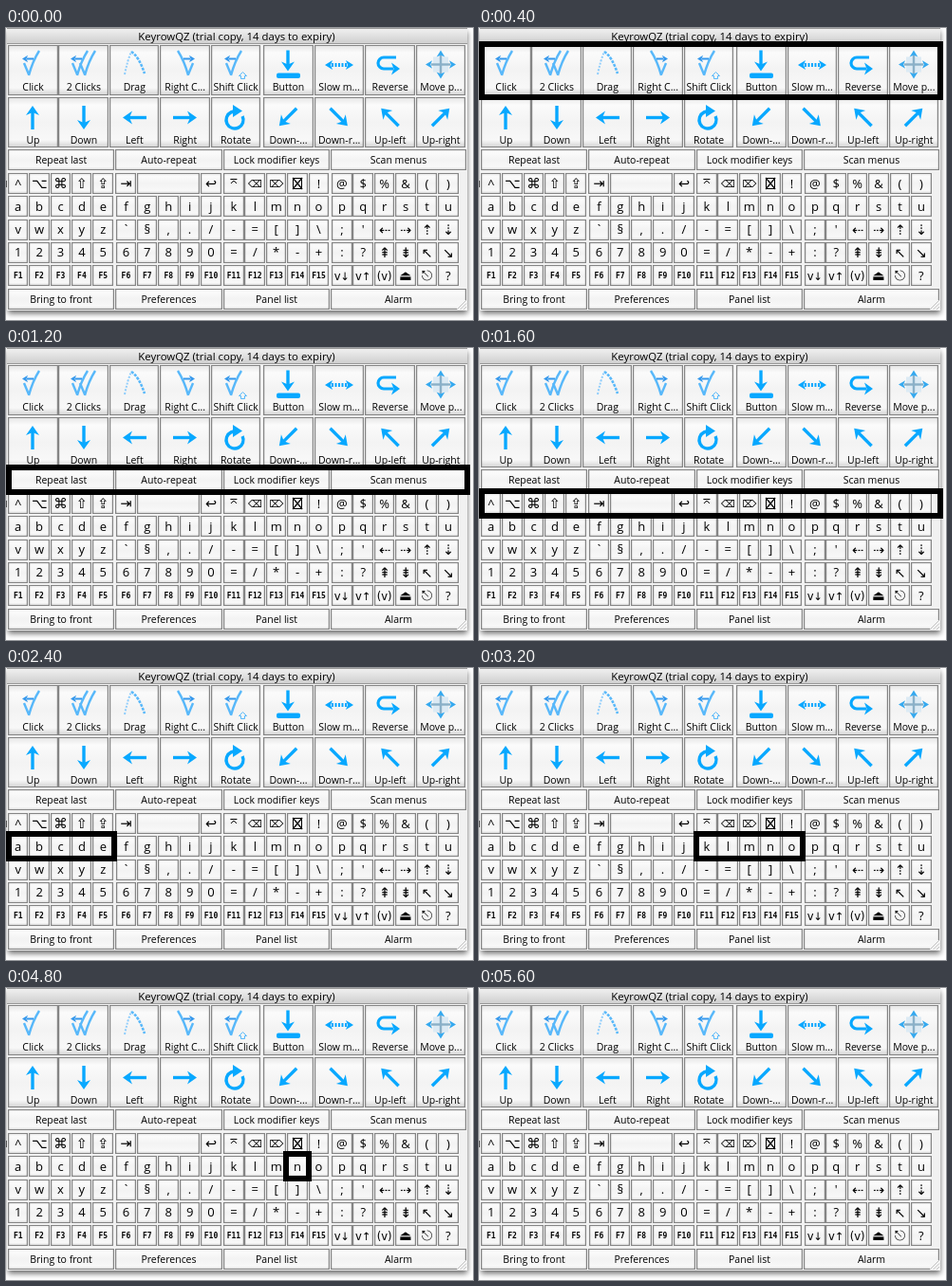
These frames come from a looping animation (492x308 px, 6 s). An HTML page with a canvas:

```html
<!DOCTYPE html>
<html lang="en">
<head>
<meta charset="utf-8">
<title>Scanning keyboard panel</title>
<style>
html, body { margin: 0; width: 100%; height: 100%; overflow: hidden; background: #fff; }
canvas { display: block; }
</style>
</head>
<body>
<canvas id="stage" width="492" height="308"></canvas>
<script>
const stage = document.getElementById('stage');
const view = stage.getContext('2d');
const panel = document.createElement('canvas');
panel.width = stage.width;
panel.height = stage.height;
const c = panel.getContext('2d');

const SANS = '"Open Sans", "Noto Sans", "DejaVu Sans", sans-serif';
const SYMBOLS = '"DejaVu Sans", sans-serif';
const MONO = '"DejaVu Sans Mono", monospace';
const BLUE = '#08a8ff';
const PALE = '#58b8fa';

function label(text, x, y, size = 10.5, family = SANS, weight = '') {
  c.font = `${weight} ${size}px ${family}`;
  c.textAlign = 'center';
  c.fillStyle = '#000';
  c.fillText(text, x, y);
}

function cell(x0, y0, x1, y1) {
  const x = Math.round(x0), y = Math.round(y0);
  const w = Math.round(x1) - x, h = Math.round(y1) - y;
  c.fillStyle = '#858585';
  c.fillRect(x, y, w, h);
  const face = c.createLinearGradient(0, y, 0, y + h);
  face.addColorStop(0, '#e4e4e4');
  face.addColorStop(0.15, '#fbfbfb');
  face.addColorStop(0.5, '#f3f3f3');
  face.addColorStop(0.85, '#f8f8f8');
  face.addColorStop(1, '#d2d2d2');
  c.fillStyle = face;
  c.fillRect(x + 1, y + 1, w - 2, h - 2);
  c.fillStyle = 'rgba(0,0,0,.1)';
  c.fillRect(x + 1, y + 1, 1, h - 2);
  c.fillRect(x + w - 2, y + 1, 1, h - 2);
}

function line(points, width, color = BLUE, dash = []) {
  c.strokeStyle = color;
  c.lineWidth = width;
  c.setLineDash(dash);
  c.beginPath();
  points.forEach(([x, y]) => c.lineTo(x, y));
  c.stroke();
  c.setLineDash([]);
}

function curve([x0, y0], [cx, cy], [x1, y1], width, color, dash = []) {
  c.strokeStyle = color;
  c.lineWidth = width;
  c.setLineDash(dash);
  c.beginPath();
  c.moveTo(x0, y0);
  c.quadraticCurveTo(cx, cy, x1, y1);
  c.stroke();
  c.setLineDash([]);
}

function poly(points, color = BLUE) {
  c.fillStyle = color;
  c.beginPath();
  points.forEach(([x, y]) => c.lineTo(x, y));
  c.fill();
}

function at(x, y, angle, draw, flip = 1) {
  c.save();
  c.translate(x, y);
  c.rotate(angle);
  c.scale(flip, 1);
  draw();
  c.restore();
}

const head = (x, y, angle, size, color) => at(x, y, angle, () =>
  poly([[0, 0], [-size, -size * 0.62], [-size * 0.75, 0], [-size, size * 0.62]], color));

// Arrow centred on a point; angle 0 points right.
function arrow(x, y, angle, length = 25) {
  const tip = length / 2;
  at(x, y, angle, () => {
    line([[-tip, 0], [tip - 5, 0]], 3.4);
    poly([[tip, 0], [tip - 10, -7], [tip - 7, 0], [tip - 10, 7]]);
  });
}

// Click mark: a tick with a small arrow towards the mouse button's side.
function tick(x, flip = 1, withArrow = true) {
  at(x, 0, 0, () => {
    line([[-9, 37], [-4, 49]], 2.4, PALE);
    curve([-4, 50], [0, 35], [7, 24], 2.4, PALE);
    if (!withArrow) return;
    line([[-6, 32.5], [1, 32.5]], 2, '#3598ec');
    head(-11, 32.5, Math.PI, 6, '#3598ec');
  }, flip);
}

function dragIcon() {
  curve([125, 49], [128, 34], [132, 25], 2, '#8fcdfb', [2, 1.5]);
  curve([132, 25], [140, 30], [146, 48], 2.6, PALE, [3, 1.2]);
}

function shiftMark(x, y) {
  line([[x, y - 4], [x + 4, y], [x + 2, y], [x + 2, y + 3], [x - 2, y + 3],
    [x - 2, y], [x - 4, y], [x, y - 4]], 1, PALE);
}

function buttonIcon() {
  arrow(297, 34.5, Math.PI / 2, 22);
  c.fillStyle = BLUE;
  c.beginPath();
  c.roundRect(285, 47.5, 25, 5.5, 2);
  c.fill();
}

function slowIcon() {
  line([[343, 39], [361, 39]], 4, BLUE, [2, 1.5]);
  head(336, 39, Math.PI, 8);
  head(366, 39, 0, 8);
}

function reverseIcon() {
  c.strokeStyle = BLUE;
  c.lineWidth = 3.2;
  c.beginPath();
  c.moveTo(411, 31);
  c.lineTo(398, 31);
  c.arc(398, 37, 6, -Math.PI / 2, Math.PI / 2, true);
  c.lineTo(408, 43);
  c.stroke();
  poly([[415, 43], [406, 36.5], [408.5, 43], [406, 49.5]]);
}

function moveIcon() {
  const x = 458, y = 38.5;
  c.fillStyle = '#dceaf4';
  c.fillRect(x - 8, y - 8, 16, 16);
  line([[x - 10, y], [x + 10, y]], 2.4, '#8ab0c8');
  line([[x, y - 10], [x, y + 10]], 2.4, '#8ab0c8');
  for (let i = 0; i < 4; i++) {
    const a = i * Math.PI / 2;
    head(x + 16 * Math.cos(a), y + 15 * Math.sin(a), a, 7, '#35a9ef');
  }
}

function rotateIcon() {
  c.strokeStyle = BLUE;
  c.lineWidth = 3.4;
  c.beginPath();
  c.arc(241, 97, 9, -0.45, Math.PI * 1.5);
  c.stroke();
  poly([[239, 81], [249, 87.5], [239, 94]]);
}

function drawFrame() {
  c.fillStyle = '#fff';
  c.fillRect(0, 0, 492, 308);
  c.save();
  c.shadowColor = 'rgba(0,0,0,.6)';
  c.shadowBlur = 6;
  c.shadowOffsetY = 3;
  c.fillStyle = '#eee';
  c.fillRect(2, 1, 484, 297);
  c.restore();
  c.fillStyle = '#f1f1f1';
  c.fillRect(1, 0, 485, 298);
  const bar = c.createLinearGradient(0, 0, 0, 16);
  bar.addColorStop(0, '#f2f2f2');
  bar.addColorStop(1, '#cfcfcf');
  c.fillStyle = bar;
  c.fillRect(1, 0, 485, 16);
  c.fillStyle = '#999';
  c.fillRect(1, 0, 485, 1);
  c.fillRect(1, 16, 485, 1);
  c.fillStyle = '#555';
  c.fillRect(0, 161, 1, 7);
  label('KeyrowQZ (trial copy, 14 days to expiry)', 243, 13, 11.4);
}

function drawButtons() {
  const names = [
    ['Click', '2 Clicks', 'Drag', 'Right C...', 'Shift Click', 'Button', 'Slow m...', 'Reverse', 'Move p...'],
    ['Up', 'Down', 'Left', 'Right', 'Rotate', 'Down-...', 'Down-r...', 'Up-left', 'Up-right']
  ];
  names.forEach((row, r) => row.forEach((name, i) => {
    const x = i < 5 ? 2 + i * 53.4 : 271 + (i - 5) * 53.6;
    cell(x, r ? 73 : 18, x + 52.6, r ? 126 : 71);
    label(name, x + 26.5, r ? 122 : 66);
  }));

  tick(28);
  tick(79);
  tick(87, 1, false);
  dragIcon();
  tick(188, -1);
  tick(241);
  shiftMark(249.5, 50.5);
  buttonIcon();
  slowIcon();
  reverseIcon();
  moveIcon();

  const q = Math.PI / 4;
  arrow(28, 94.5, -2 * q);
  arrow(82, 94.5, 2 * q);
  arrow(135.5, 94.5, 4 * q);
  arrow(188.5, 94.5, 0);
  rotateIcon();
  [3, 1, -3, -1].forEach((n, i) => arrow(297 + i * 53.7, 94, n * q, 26));
}

function drawBars() {
  const edges = [2, 115, 229, 342, 486];
  const bars = [
    [128, ['Repeat last', 'Auto-repeat', 'Lock modifier keys', 'Scan menus']],
    [275, ['Bring to front', 'Preferences', 'Panel list', 'Alarm']]
  ];
  for (const [y, names] of bars) {
    names.forEach((name, i) => {
      cell(edges[i], y, edges[i + 1] - 1, y + 22);
      label(name, (edges[i] + edges[i + 1] - 1) / 2, y + 15);
    });
  }
  c.fillStyle = '#f6f6f6';
  c.fillRect(475, 287, 10, 10);
  for (let i = 0; i < 3; i++) line([[475 + i * 3.5, 297], [485, 287 + i * 3.5]], 1, '#c0c0c0');
}

function glyph(ch, x, y) {
  if (ch === '⌅') {
    line([[x - 3.5, y - 4.5], [x + 3.5, y - 4.5]], 1, '#000');
    line([[x - 3, y], [x, y - 3], [x + 3, y]], 1, '#000');
  } else if (ch === '⌧') {
    c.strokeStyle = '#000';
    c.lineWidth = 1;
    c.strokeRect(Math.round(x) - 4.5, Math.round(y) - 5.5, 9, 11);
    line([[x - 5, y - 6], [x + 5, y + 6]], 1.2, '#000');
    line([[x + 5, y - 6], [x - 5, y + 6]], 1.2, '#000');
  } else if (/^F\d/.test(ch)) {
    label(ch, x, y + 3, 8, MONO, 'bold');
  } else if ('⌫⌦'.includes(ch)) {
    label(ch, x, y + 4, 10.5, SYMBOLS);
  } else if (ch.charCodeAt(0) > 0x2000) {
    label(ch, x, y + 5, 14.5, SYMBOLS);
  } else if (ch.length > 1) {
    label(ch, x, y + 4.5, 11.5, SYMBOLS);
  } else {
    label(ch, x, y + 4.5, 13);
  }
}

function drawKeys() {
  const step = 22.4;
  const rows = [
    ['^ ⌥ ⌘ ⇧ ⇪', '', '⌅ ⌫ ⌦ ⌧ !', '@ $ % & ( )'],
    ['a b c d e', 'f g h i j', 'k l m n o', 'p q r s t u'],
    ['v w x y z', '` § , . /', '- = [ ] \\', "; ' ⇠ ⇢ ⇡ ⇣"],
    ['1 2 3 4 5', '6 7 8 9 0', '= / * - +', ': ? ⇞ ⇟ ↖ ↘'],
    ['F1 F2 F3 F4 F5', 'F6 F7 F8 F9 F10', 'F11 F12 F13 F14 F15', 'v↓ v↑ (v) ⏏ ⎋ ?']
  ];
  rows.forEach((groups, r) => {
    const y = 153 + r * 24.3;
    groups.forEach((keys, g) => {
      if (!keys) return;
      const left = [1.8, 115.5, 229, 343][g];
      keys.split(' ').forEach((key, i) => {
        const x = left + i * step;
        cell(x, y, x + step - 0.9, y + 22);
        glyph(key, x + 10.9, y + 11);
      });
    });
  });
  cell(115, 153, 137, 175);
  cell(138, 153, 204, 175);
  cell(205, 153, 227, 175);
  glyph('⇥', 126.5, 164);
  glyph('↩', 216, 164);
}

// Scan order: rows, then groups of a row, then single keys.
const spots = [
  ...[[14, 76], [69, 131], [123, 155], [148, 180], [172, 204]].map(([a, b]) => [0, a, 489, b]),
  ...[[0, 117], [112, 230], [226, 344], [226, 256], [247, 277], [270, 300], [292, 322]].map(([a, b]) => [a, 172, b, 204])
];
const STEP = 400, LOOP = 6000, EDGE = 6;

function render(time) {
  const n = Math.floor((time % LOOP) / STEP);
  view.drawImage(panel, 0, 0);
  const spot = spots[n - 1];
  if (spot) {
    const [x0, y0, x1, y1] = spot;
    view.strokeStyle = '#000';
    view.lineWidth = EDGE;
    view.strokeRect(x0 + EDGE / 2, y0 + EDGE / 2, x1 - x0 - EDGE, y1 - y0 - EDGE);
  } else if (n === spots.length + 1) {
    // The chosen key flashes inverted.
    view.globalCompositeOperation = 'difference';
    view.fillStyle = '#fff';
    view.fillRect(295, 175, 24, 26);
    view.globalCompositeOperation = 'source-over';
  }
}

drawFrame();
drawButtons();
drawBars();
drawKeys();

const start = performance.now();
function animate() {
  render(performance.now() - start);
  requestAnimationFrame(animate);
}
animate();
</script>
</body>
</html>
```
